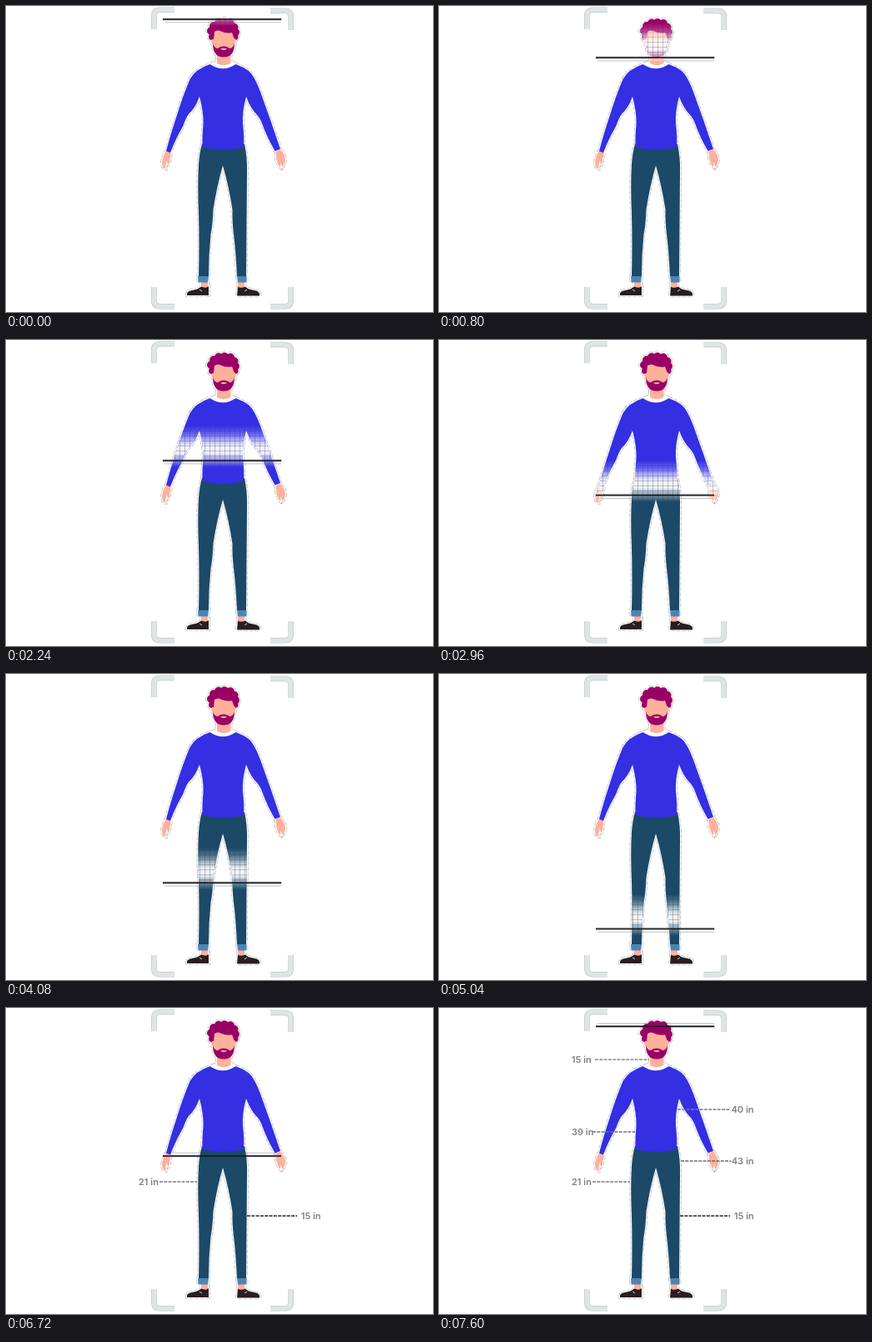
Animation, 512 px wide and 368 px high, one loop 7.68 s. Source, as an HTML page with a canvas:

```html
<!DOCTYPE html>
<html lang="en">
<head>
<meta charset="utf-8">
<title>Body scan</title>
<style>
html, body { margin: 0; width: 100%; height: 100%; overflow: hidden; background: #fff; }
canvas { display: block; }
</style>
</head>
<body>
<canvas id="stage" width="512" height="368"></canvas>
<script>
const W = 512, H = 368, LOOP = 7680, TURN = 5760, STEP = 80;
const ctx = document.getElementById('stage').getContext('2d');

function layer() {
  const c = document.createElement('canvas');
  c.width = W;
  c.height = H;
  return c.getContext('2d');
}

const SKIN = '#ffb09b', HAIR = '#990066', SHIRT = '#342fe3';
const JEANS = '#1c4967', CUFF = '#4b86b3', SHOE = '#2a1c20';

function curls() {
  const p = new Path2D('M247 20H274V36H247Z');
  const spots = [[246, 30, 5], [249, 24, 5], [255, 20.5, 5], [262, 20, 5], [269, 21, 5],
    [273.5, 25.5, 5], [275, 31.5, 5], [274.5, 37, 4], [247, 37, 4]];
  for (const [x, y, r] of spots) {
    p.moveTo(x + r, y);
    p.arc(x, y, r, 0, Math.PI * 2);
  }
  return p;
}

const parts = [
  [SKIN, new Path2D('M253 54H269.500V72Q261 76 253 72Z')],
  [SKIN, new Path2D('M192.500 174L197.500 176Q198 181 196 184Q197 189 194.500 191L192.500 186Q191 191 191.500 196Q187.500 195 187 189Q187.500 180 192.500 174Z')],
  [SKIN, new Path2D('M323.500 175L329 172.500Q334 178 335 184Q335 190 331.500 194L329.500 188L329 194Q325 190 324 183Z')],
  [SKIN, new Path2D('M234 331H242V341H234ZM278 331H286V341H278Z')],
  [JEANS, new Path2D('M235 166H286Q289.500 182 289 200L288 326H277Q275.500 295 273 275Q271 258 271.500 245Q267 216 260 192Q253 216 248.500 245Q248 262 245.500 275Q243 300 243 326H231Q232 285 231 250Q229.500 214 231 190Q232 176 235 166Z')],
  ['#ffffff', new Path2D('M247 69L251 67.500Q261 75 271 67.500L274 69L276 71Q261 81 245 71Z')],
  [SHIRT, new Path2D('M244.500 70Q260 80.500 275.500 70Q284 73 291 78Q298 84 305 103Q317 136 329 172L322.500 174.500Q313 158 308 144Q305 135 301 131Q293 123 288 109Q283 127 284 142Q286 157 285 170Q261 176 235.500 170Q235 158 236.500 142Q237 128 232 109Q227 123 219 130Q215.500 135 212.500 144L206 156Q201 166 197 176.500L192 174.500Q197 155 205 131Q212 108 220.500 88Q227 76 244.500 70Z')],
  [CUFF, new Path2D('M230 325H243L242 332.500H230.500ZM277 325H288.500V332.500H278Z')],
  [SHOE, new Path2D('M234 337.500Q240 340 243 337V348H217Q216 343 223 342Q230 341 234 337.500ZM278 337.500Q281 340 287 337.500Q290 341 298 342Q305 343 304 348.500H277Z')],
  [HAIR, curls()],
  [SKIN, new Path2D('M250 31Q254 28.500 258 30.500Q264 33.500 271 32L273.500 39Q276 39 275.500 43Q275 46 273 47Q270 57 261 57Q252 57 249 47Q246 46 246 42Q247 39 249 40Z')],
  [HAIR, new Path2D('M248 45Q250 51 254 51Q257 48 261 48.500Q265 48 268 51Q272 51 274 45Q274 61.500 261 61.500Q248 61.500 248 45Z')],
  ['#ffb09b', new Path2D('M257 51.500Q261 50 265 51.500Q261 54.500 257 51.500Z')]
];

function fillParts(c) {
  for (const [color, path] of parts) {
    c.fillStyle = color;
    c.fill(path);
  }
}

const frame = layer(), body = layer(), mesh = layer(), band = layer();

function corner(x, y, sx, sy) {
  frame.save();
  frame.translate(x, y);
  frame.scale(sx, sy);
  const p = new Path2D('M3.300 27V11Q3.300 4 11 3.700H28');
  for (const [width, color] of [[6.6, '#bcc1c1'], [5.6, '#dfe4e4']]) {
    frame.lineWidth = width;
    frame.strokeStyle = color;
    frame.stroke(p);
  }
  frame.restore();
}

function outline(width, color) {
  frame.lineWidth = width;
  frame.strokeStyle = color;
  for (const [, path] of parts) frame.stroke(path);
}

function buildLayers() {
  corner(174, 1, 1, 1);
  corner(345, 2, -1, 1);
  corner(174, 365, 1, -1);
  corner(345, 365, -1, -1);

  // thin broken contour with a white gap
  frame.setLineDash([5, 1.5]);
  outline(3.6, '#a9adb0');
  frame.setLineDash([]);
  outline(2.4, '#fff');

  fillParts(body);
  body.strokeStyle = '#d8d4d4';
  body.stroke(new Path2D('M232 341L235 343M289 341L286 343'));

  fillParts(mesh);
  mesh.globalCompositeOperation = 'source-in';
  mesh.fillStyle = '#fff';
  mesh.fillRect(0, 0, W, H);
  mesh.globalCompositeOperation = 'source-atop';
  mesh.fillStyle = 'rgba(75,80,115,.42)';
  for (let x = 184; x < 340; x += 6) mesh.fillRect(x, 0, 0.8, H);
  for (let y = 13; y < 352; y += 6) mesh.fillRect(180, y, 160, 0.8);
}

function barY(t) {
  return t < TURN ? 16 + 332 * t / TURN : 348 - 340 * (t - TURN) / (LOOP - TURN);
}

function drawBand(y) {
  band.globalCompositeOperation = 'source-over';
  band.clearRect(0, 0, W, H);
  band.drawImage(mesh.canvas, 0, 0);
  band.globalCompositeOperation = 'destination-in';
  const g = band.createLinearGradient(0, y - 42, 0, y + 8);
  for (const [at, a] of [[0, 0], [0.2, 0.25], [0.36, 0.66], [0.5, 0.94], [0.66, 0.94], [0.84, 0.42], [1, 0]]) {
    g.addColorStop(at, `rgba(0,0,0,${a})`);
  }
  band.fillStyle = g;
  band.fillRect(0, 0, W, H);
  ctx.drawImage(band.canvas, 0, 0);
}

// text, y, line start, line end, line color
const labels = [
  ['15 in', 250, 289, 349, '#20222a'],
  ['21 in', 209, 184, 229, '#777b88'],
  ['43 in', 184, 290, 350, '#676b7c'],
  ['39 in', 149, 184, 235, '#6b7090'],
  ['40 in', 122, 286, 349, '#777b8e'],
  ['15 in', 62, 187, 252, '#858993']
];

function drawLabel([text, y, x1, x2, color], t) {
  const shown = TURN + (348 - y) * (LOOP - TURN) / 340 + 40;
  if (t < shown) return;
  ctx.strokeStyle = color;
  ctx.lineWidth = 1.5;
  ctx.setLineDash([4, 1.3]);
  ctx.beginPath();
  ctx.moveTo(x1, y);
  ctx.lineTo(x2, y);
  ctx.stroke();
  ctx.setLineDash([]);
  if (t < shown + 70) return;
  const left = x1 < 256;
  ctx.font = '600 11px Inter, Lato, sans-serif';
  ctx.textAlign = left ? 'left' : 'right';
  ctx.fillStyle = '#7b8088';
  ctx.fillText(text, left ? 159 : 377.5, y + 4);
}

// faint trailing edge on the side the bar moves towards
function drawGlow(y, dir) {
  ctx.fillStyle = 'rgba(120,124,130,.25)';
  ctx.fillRect(188, y - 2, 143, 4);
  ctx.fillStyle = '#b0b3b6';
  ctx.fillRect(190, y + dir * 3.8 - 0.4, 140, 0.8);
}

function drawBar(y) {
  ctx.fillStyle = '#15171c';
  ctx.fillRect(188, y - 0.8, 142, 1.6);
}

function draw(now) {
  const t = Math.floor(now % LOOP / STEP) * STEP;
  const y = barY(t);
  const down = t < TURN;
  ctx.fillStyle = '#fff';
  ctx.fillRect(0, 0, W, H);
  ctx.drawImage(frame.canvas, 0, 0);
  drawGlow(y, down ? 1 : -1);
  ctx.drawImage(body.canvas, 0, 0);
  if (down) drawBand(y);
  for (const label of labels) drawLabel(label, t);
  drawBar(y);
}

buildLayers();
let start;
function tick(now) {
  if (start === undefined) start = now;
  draw(now - start);
  requestAnimationFrame(tick);
}
draw(0);
requestAnimationFrame(tick);
</script>
</body>
</html>
```
